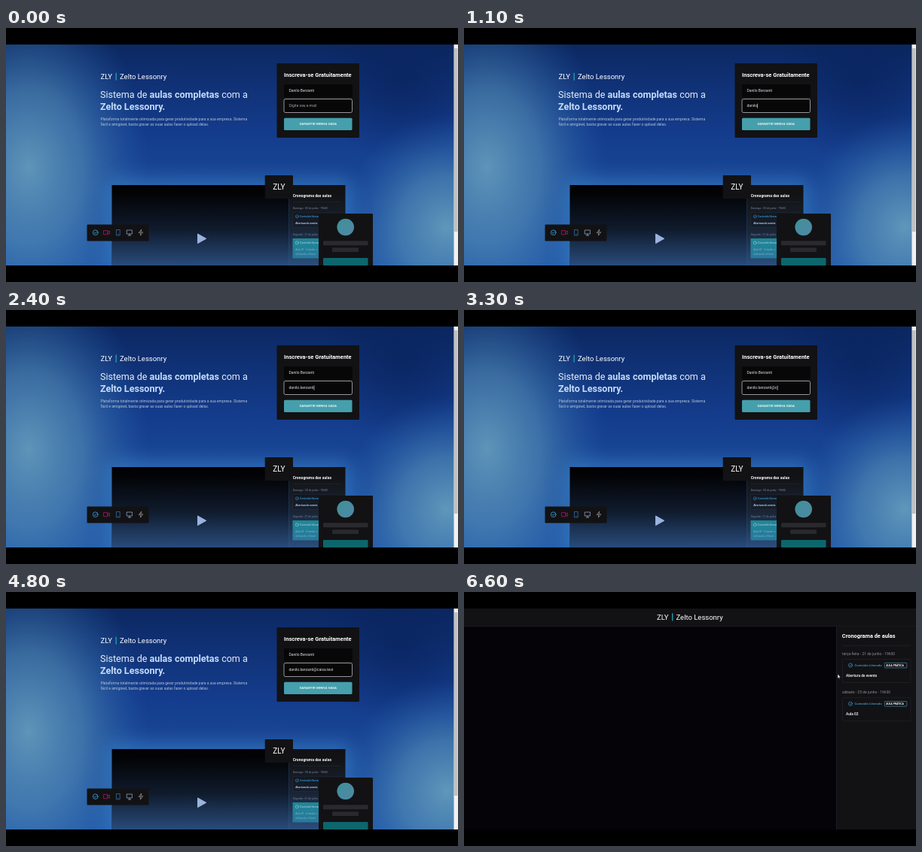
An HTML page for the animation above (8 s loop, 600 px wide and 338 px high).

```html
<!DOCTYPE html>
<html lang="pt">
<head>
<meta charset="utf-8">
<style>
  html, body { margin: 0; width: 100%; height: 100%; overflow: hidden; background: #000; }
  svg { display: block; width: 100%; height: 100%; font-family: Roboto, Arial, sans-serif; fill: #e1e1e6; }
  text { white-space: pre; }
  .b { font-weight: 700; }
  .line { fill: none; stroke-width: .65; stroke-linejoin: round; stroke-linecap: round; }
  .panel { fill: #121214; }
  .grey { fill: #8d8d99; }
  .blue { fill: #3f9bd6; font-weight: 500; }
</style>
</head>
<body>
<svg viewBox="0 0 600 338">
  <defs>
    <linearGradient id="base" x2="0" y2="1">
      <stop offset="0" stop-color="#0c2862"/><stop offset=".4" stop-color="#143c8c"/>
      <stop offset="1" stop-color="#2257a6"/>
    </linearGradient>
    <radialGradient id="glow">
      <stop offset="0" stop-color="#6ba3bf" stop-opacity=".85"/>
      <stop offset=".45" stop-color="#5590b8" stop-opacity=".6"/>
      <stop offset="1" stop-color="#2a68b0" stop-opacity="0"/>
    </radialGradient>
    <radialGradient id="dark">
      <stop offset="0" stop-color="#071f58" stop-opacity=".6"/><stop offset="1" stop-color="#071f58" stop-opacity="0"/>
    </radialGradient>
    <linearGradient id="video" x2="0" y2="1">
      <stop offset="0" stop-color="#020204"/><stop offset="1" stop-color="#07090f"/>
    </linearGradient>
    <linearGradient id="fade" x2="0" y2="1">
      <stop offset=".1" stop-color="#3565a5" stop-opacity="0"/>
      <stop offset=".55" stop-color="#3565a5" stop-opacity=".22"/>
      <stop offset="1" stop-color="#3565a5" stop-opacity=".72"/>
    </linearGradient>
    <linearGradient id="face" x2="1" y2="1">
      <stop offset="0" stop-color="#3f9098"/><stop offset="1" stop-color="#5088a6"/>
    </linearGradient>
    <filter id="blur" x="-30%" y="-30%" width="160%" height="160%"><feGaussianBlur stdDeviation="13"/></filter>
    <clipPath id="view"><rect y="22" width="600" height="294"/></clipPath>
    <g id="brand" font-size="9.5" fill="#fff">
      <text>ZLY</text>
      <rect x="20" y="-8.5" width="1.3" height="10" fill="#2a9fb0"/>
      <text x="25.5">Zelto Lessonry</text>
    </g>
    <g id="check" class="line" stroke="#3f9bd6">
      <circle r="2.6"/><path d="M-1.2 0l.9 1 1.6-1.9"/>
    </g>
    <g id="free">
      <rect class="panel" x=".5" y=".5" width="90.5" height="31" rx="1" stroke="#222226" stroke-width=".8"/>
      <use href="#check" x="11" y="8.5"/>
      <text class="blue" x="16.5" y="10" font-size="4.25">Conteúdo Liberado</text>
      <rect x="56.3" y="5.3" width="29.5" height="6.6" rx=".8" fill="none" stroke="#3f8fb8" stroke-width=".7"/>
      <text class="b" x="58.2" y="9.9" font-size="3.4" fill="#fff">AULA PRÁTICA</text>
    </g>
  </defs>

  <g id="signup" clip-path="url(#view)">
    <rect y="22" width="600" height="294" fill="url(#base)"/>
    <ellipse cx="525" cy="70" rx="110" ry="110" fill="url(#dark)"/>
    <ellipse cx="30" cy="185" rx="160" ry="230" fill="url(#glow)"/>
    <ellipse cx="585" cy="265" rx="140" ry="150" fill="url(#glow)"/>
    <rect x="134" y="202" width="324" height="128" fill="#3a84c8" opacity=".65" filter="url(#blur)"/>

    <use href="#brand" x="125.5" y="68.2"/>
    <g font-size="12.55" fill="#e6edf8">
      <text x="125" y="93">Sistema de <tspan class="b" fill="#c4dcfa">aulas completas</tspan> com a</text>
      <text class="b" x="125" y="108.6" fill="#c4dcfa">Zelto Lessonry.</text>
    </g>
    <g font-size="5" fill="#b9c6da">
      <text x="125.5" y="122.8">Plataforma totalmente otimizada para gerar produtividade para a sua empresa. Sistema</text>
      <text x="125.5" y="130.3">fácil e amigável, basta gravar as suas aulas fazer o upload delas.</text>
    </g>

    <rect class="panel" x="359.5" y="47" width="109.5" height="99" rx="1"/>
    <text class="b" x="369" y="64.6" font-size="7.5" fill="#fff">Inscreva-se Gratuitamente</text>
    <rect x="369" y="75" width="91" height="17" rx="1.5" fill="#070708"/>
    <rect x="369" y="94.5" width="90.5" height="18" rx="2" fill="#070708" stroke="#d0d0d6" stroke-width=".7"/>
    <g font-size="5">
      <text x="375.5" y="85.4">Danilo Berzanti</text>
      <text id="mail" x="375.5" y="105.3"></text>
    </g>
    <rect id="caret" y="100.6" width=".6" height="6" fill="#fff"/>
    <rect id="button" x="369" y="119.7" width="90.5" height="16.4" rx="1.5"/>
    <text class="b" x="414.2" y="129.4" font-size="4.4" fill="#e2f2f2" text-anchor="middle">GARANTIR MINHA VAGA</text>

    <rect x="140.5" y="209" width="235" height="107" fill="url(#video)"/>
    <rect class="panel" x="375.5" y="209" width="75" height="107"/>
    <text class="b" x="380.7" y="224.8" font-size="5.1" fill="#fff">Cronograma das aulas</text>
    <path d="M381 231.5h64" stroke="#25252a" stroke-width=".6"/>
    <g font-size="3.4">
      <text class="grey" x="380.7" y="240.5">Domingo - 20 de junho - 19h00</text>
      <rect x="380.5" y="245.5" width="64" height="20" fill="#0d0d0f" stroke="#202024" stroke-width=".6"/>
      <use href="#check" transform="translate(386.3 250.8) scale(.8)"/>
      <text class="blue" x="390" y="252">Conteúdo liberado</text>
      <text class="b" x="384.3" y="261">Abertura do evento</text>
      <text class="grey" x="380.7" y="276">Segunda - 21 de junho - 19h30</text>
      <rect x="380.5" y="280" width="64" height="26.5" fill="#129a8e"/>
      <g fill="#e8ffff">
        <circle class="line" cx="386.3" cy="285.8" r="2" stroke="#e8ffff"/>
        <text x="390" y="287" font-weight="500">Conteúdo liberado</text>
        <text x="384.3" y="296">Aula 01 - Criando o</text>
        <text x="384.3" y="301.5">utilizando o React</text>
      </g>
    </g>
    <rect x="140.5" y="209" width="310" height="107" fill="url(#fade)"/>
    <path d="M254.5 274v12.6l11.2-6.3z" fill="#9bb2dc" stroke="#9bb2dc" stroke-linejoin="round"/>

    <rect class="panel" x="343.7" y="196" width="37.3" height="31.3" rx="1"/>
    <text x="362.3" y="214.8" font-size="10" text-anchor="middle" fill="#fff">ZLY</text>

    <rect class="panel" x="415" y="247" width="72" height="70" rx="1"/>
    <circle cx="450.7" cy="265" r="11.3" fill="url(#face)"/>
    <g fill="#29292e">
      <rect x="421" y="283.3" width="59.5" height="6" rx="1"/>
      <rect x="433" y="292.3" width="35" height="5.8" rx="1"/>
    </g>
    <rect x="421" y="306" width="59.5" height="10" rx="1" fill="#0d666c"/>

    <rect class="panel" x="107.5" y="261.5" width="82" height="22" rx="1"/>
    <g class="line">
      <use href="#check" transform="translate(118.7 272.2) scale(1.3)"/>
      <path d="M129.8 269.6h5v5.2h-5zM134.8 271.5l2.6-1.5v4.4l-2.6-1.5" stroke="#d0187c"/>
      <path d="M146.8 268.5h4.4v7.4h-4.4zM148.7 274.4h.6" stroke="#3f83c8"/>
      <path d="M160.6 269h6.8v5h-6.8zM164 274v2M162.3 276h3.4" stroke="#a9bfe0"/>
      <path d="M179.6 268.3l-3.4 4.3h2.6l-.4 3.5 3.3-4.4h-2.5z" stroke="#b0b0b8"/>
    </g>

    <rect x="594.5" y="22" width="5.5" height="294" fill="#f1f1f1"/>
    <rect x="595" y="27" width="4.5" height="244" fill="#c1c1c1"/>
  </g>

  <g id="lessons">
    <rect y="22" width="600" height="294" fill="#050308"/>
    <rect class="panel" y="22" width="600" height="23.5"/>
    <path d="M0 45.7h600" stroke="#242428" stroke-width=".7"/>
    <use href="#brand" x="256" y="36.8"/>
    <rect class="panel" x="494" y="46" width="106" height="270"/>
    <path d="M494.4 46v270M502 71.3h91" stroke="#26262b" stroke-width=".7"/>
    <text class="b" x="501.8" y="61" font-size="7.4" fill="#fff">Cronograma de aulas</text>
    <g id="items">
      <g class="grey" font-size="5">
        <text x="502" y="84.2">terça-feira - 21 de junho - 19h00</text>
        <text x="502" y="135.4">sábado - 25 de junho - 16h30</text>
      </g>
      <use href="#free" x="502" y="89"/>
      <use href="#free" x="502" y="140.2"/>
      <g class="b" font-size="4.8">
        <text x="507" y="112.6">Abertura do evento</text>
        <text x="507" y="164">Aula 02</text>
      </g>
    </g>
  </g>

  <g id="mouse" fill="#fff" stroke="#000" stroke-width=".5" stroke-linejoin="round">
    <path id="arrow" d="M0 0v5.6l1.3-1.2.9 2 .9-.4-.9-1.9h1.8z"/>
    <path id="hand" d="M-.6 0q.6-.8 1.1 0v2.4l2.4.6q.7.3.5 1.2l-.6 2.4h-3l-1.9-2.6q0-.9.8-.5l.7.6z"/>
  </g>
</svg>
<script>
const $ = id => document.getElementById(id);
const LOOP = 8000, STEP = 100, SWITCH = 6100, LOADED = 6300;
const address = "danilo.berzanti@caixa.test";
// [time, letters typed]
const typing = [[300, 0], [1100, 6], [2300, 15], [3000, 16], [3200, 17], [4250, 26]];
// [time, x, y]
const route = [[5200, 450, 108], [5500, 455, 131], [5800, 455, 131], [6250, 496, 109.3]];
const lastKey = typing[typing.length - 1][0];

function along(keys, t, col, ease = p => p) {
  if (t <= keys[0][0]) return keys[0][col];
  for (let i = 1; i < keys.length; i++) {
    const a = keys[i - 1], b = keys[i];
    if (t < b[0]) return a[col] + (b[col] - a[col]) * ease((t - a[0]) / (b[0] - a[0]));
  }
  return keys[keys.length - 1][col];
}
const smooth = p => p * p * (3 - 2 * p);
const show = (id, on) => $(id).style.display = on ? "" : "none";

function draw(now) {
  const t = Math.floor(now % LOOP / STEP) * STEP;
  const typed = Math.floor(along(typing, t, 1) + 1e-6);
  const x = along(route, t, 1, smooth), y = along(route, t, 2, smooth);
  const hover = t < SWITCH && x < 459.5 && y > 119.7;

  show("signup", t < SWITCH);
  show("lessons", t >= SWITCH);
  show("items", t >= LOADED);

  const mail = $("mail");
  mail.textContent = typed ? address.slice(0, typed) : "Digite seu e-mail";
  mail.style.fill = typed ? "#e1e1e6" : "#a0a0aa";
  if (typed && t < SWITCH) $("caret").setAttribute("x", 375.8 + mail.getComputedTextLength());
  show("caret", typed && (t < lastKey || Math.floor((t - lastKey) / 500) % 2 === 0));
  $("button").style.fill = hover ? "#1fb9b4" : "#459fac";

  show("mouse", t >= route[0][0]);
  show("hand", hover);
  show("arrow", !hover);
  $("mouse").setAttribute("transform", `translate(${x} ${y})`);
}

let start;
function tick(now) {
  start ??= now;
  draw(now - start);
  requestAnimationFrame(tick);
}
draw(0);
requestAnimationFrame(tick);
</script>
</body>
</html>
```
